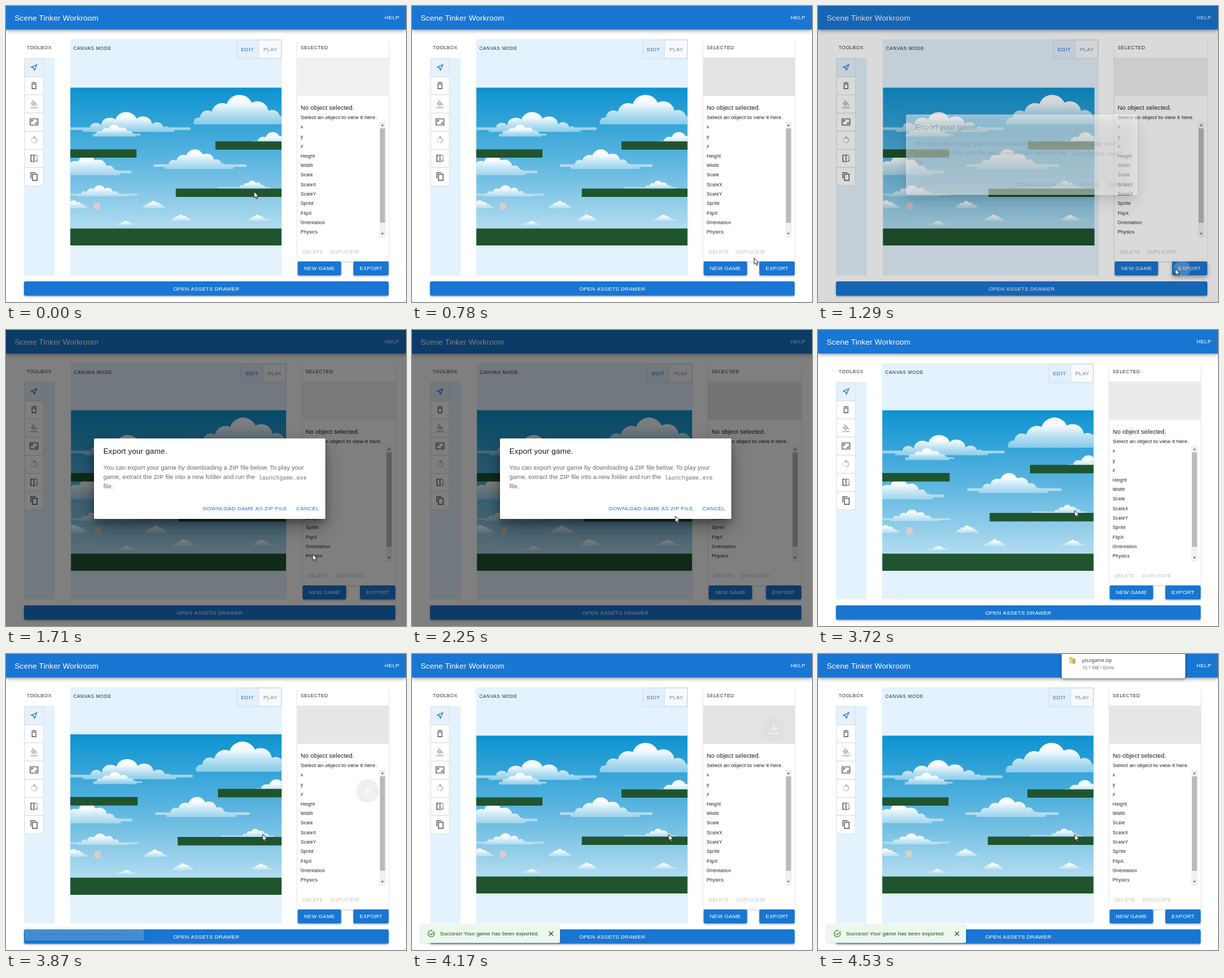
An HTML page with a canvas for the animation above (4560 ms loop, 600 by 445 pixels).

```html
<!DOCTYPE html>
<html lang="en">
<head>
<meta charset="utf-8">
<title>Game editor export</title>
<style>
html, body { margin: 0; width: 100%; height: 100%; overflow: hidden; background: #fff; }
canvas { display: block; width: 600px; height: 445px; }
</style>
</head>
<body>
<canvas id="stage" width="600" height="445"></canvas>
<script>
const ctx = document.getElementById('stage').getContext('2d');
const LOOP = 4560, STEP = 30;
const SANS = '"Liberation Sans", Arial, sans-serif';
const MONO = '"Liberation Mono", monospace';
const UI = '"Open Sans", sans-serif';
const BLUE = '#1976d2', INK = '#1c1c1c', PALE = '#e3f2fd';

const TIME = {
  press: 1170, open: 1210, grow: 1440,
  freeze: 2820, confirm: 3390, close: 3450, restore: 3645,
  fly: 3780, toast: 3803, shrink: 3930, popup: 4260
};

const clamp = v => Math.max(0, Math.min(1, v));
const ease = v => { v = clamp(v); return v * v * (3 - 2 * v); };
const mix = (a, b, k) => a + (b - a) * k;
const inside = (p, x0, y0, x1, y1) => p.x > x0 && p.x < x1 && p.y > y0 && p.y < y1;

function box(x0, y0, x1, y1, fill, r = 0) {
  ctx.fillStyle = fill;
  ctx.beginPath();
  ctx.roundRect(x0, y0, x1 - x0, y1 - y0, r);
  ctx.fill();
}

function shadowed(blur, dy, alpha, draw) {
  ctx.save();
  ctx.shadowColor = `rgba(0,0,0,${alpha})`;
  ctx.shadowBlur = blur;
  ctx.shadowOffsetY = dy;
  draw();
  ctx.restore();
}

function faded(alpha, draw) {
  if (alpha <= 0) return;
  ctx.save();
  ctx.globalAlpha *= alpha;
  draw();
  ctx.restore();
}

// y is the vertical middle of the capitals; spacing is in em.
function text(str, x, y, size, fill = INK, spacing = 0.01, family = SANS, align = 'left') {
  ctx.font = `${size}px ${family}`;
  ctx.letterSpacing = spacing * size + 'px';
  ctx.textAlign = align;
  ctx.fillStyle = fill;
  ctx.fillText(str, x, y + size * 0.36);
}
const label = (str, x, y, fill, align, size = 8.09) => text(str, x, y, size, fill, 0.0286, SANS, align);
const overline = (str, x, y) => text(str, x, y, 6.94, '#2a2a2a', 0.0833);

function icon(path, cx, cy, color, size = 13.9, width = 2) {
  ctx.save();
  ctx.translate(cx - size / 2, cy - size / 2);
  ctx.scale(size / 24, size / 24);
  ctx.strokeStyle = color;
  ctx.lineWidth = width;
  ctx.stroke(new Path2D(path));
  ctx.restore();
}

function ripple(x, y, elapsed, color, x0, y0, x1, y1) {
  if (elapsed < 0 || elapsed > 600) return;
  ctx.save();
  ctx.beginPath();
  ctx.roundRect(x0, y0, x1 - x0, y1 - y0, 2.3);
  ctx.clip();
  ctx.globalAlpha *= 1 - ease((elapsed - 250) / 350);
  ctx.fillStyle = color;
  ctx.beginPath();
  ctx.arc(x, y, 4 + 70 * ease(elapsed / 550), 0, 7);
  ctx.fill();
  ctx.restore();
}

function button(str, x0, y0, x1, y1, fill = BLUE, lift = 1) {
  shadowed(3 * lift, 1.2 * lift, 0.35, () => box(x0, y0, x1, y1, fill, 2.3));
  label(str, (x0 + x1) / 2, (y0 + y1) / 2, '#fff', 'center');
}

// Puffs relative to the cloud's middle and base, in units of its height: x, y, radius.
const PUFFS = [[0, -0.55, 0.45], [-0.58, -0.36, 0.36], [0.6, -0.4, 0.38],
  [-1.08, -0.22, 0.25], [1.1, -0.22, 0.27], [1.42, -0.12, 0.16], [-1.4, -0.1, 0.13]];
// middle, base, height, spread, streak left, streak right (scene units)
const CLOUDS = [
  [84, 67, 30, 1.4, -6, 181], [66, 74, 18, 1.15, 34, 106], [254, 55.5, 44.5, 1, 190, 330],
  [304, 92, 25, 1, 252, 330], [25, 132, 30, 1, -6, 92], [187, 122.5, 29.5, 1, 125, 265],
  [44, 164, 17, 1.25, -4, 101], [273, 153, 13, 1.1, 222, 301], [5, 181.5, 12, 1, -6, 26],
  [125, 181.5, 11, 0.95, 109, 143], [83, 207, 6.5, 1, 69, 96], [166, 201, 10, 0.95, 150, 182],
  [281, 200.5, 9, 1, 265, 301]];

function cloud([mid, base, h, spread, left, right]) {
  const paint = ctx.createLinearGradient(0, base - h, 0, base);
  paint.addColorStop(0, '#fff');
  paint.addColorStop(0.3, 'rgba(252,254,255,.95)');
  paint.addColorStop(1, 'rgba(205,234,247,.55)');
  const bar = Math.max(1.2, h * 0.13);
  const reach = 1.55 * h * spread;
  ctx.save();
  ctx.beginPath();
  ctx.rect(-20, base - h - 1, 400, h + 1);
  ctx.clip();
  ctx.beginPath();
  for (const [x, y, r] of PUFFS) {
    const cx = mid + x * h * spread, rx = r * h * Math.sqrt(spread);
    ctx.moveTo(cx + rx, base + y * h);
    ctx.ellipse(cx, base + y * h, rx, r * h, 0, 0, Math.PI * 2);
  }
  ctx.rect(mid - reach * 0.8, base - 0.3 * h, reach * 1.6, 0.3 * h);
  ctx.roundRect(left, base - bar * 1.8, right - left, bar, bar / 2);
  ctx.roundRect(mid - reach, base - bar, mix(mid, right, 0.75) - mid + reach, bar, bar / 2);
  ctx.fillStyle = paint;
  ctx.fill();
  ctx.restore();
}

function scene(left, right, large) {
  const k = large ? 322.6 / 317 : 1;
  ctx.save();
  ctx.beginPath();
  ctx.rect(left, 110, right - left, 260);
  ctx.clip();
  ctx.translate(left, 241.3 - 118.8 * k);
  ctx.scale(k, k);
  ctx.beginPath();
  ctx.rect(0, 0, 317.5, 237.5);
  ctx.clip();
  const sky = ctx.createLinearGradient(0, 0, 0, 213);
  sky.addColorStop(0, '#0d93d0');
  sky.addColorStop(0.5, '#59b4df');
  sky.addColorStop(1, '#b3dcef');
  ctx.fillStyle = sky;
  ctx.fillRect(0, 0, 318, 237.5);
  CLOUDS.forEach(cloud);
  const green = '#20542e';
  box(0, 212, 318, 238, green);
  box(0, 93, 99.5, 105.5, green);
  box(218, 81, 318, 93.5, green);
  box(158.5, 152, 318, 164.5, green);
  box(35.5, 173, 45, 183.5, '#dccbc9', 3);
  ctx.restore();
}

const TOOLS = [
  ['M19.2 4.8 5 10.9 10.800 13.200 13.100 19Z', BLUE],
  ['M7 8.500H17V20H7ZM5 5H19M9.500 3.800H14.500', '#555'],
  ['M7 2 17 11.500 11 17.500 5 11.500 11 6M5 12H17M19.500 13V17M2 22H22', '#a5a5a5'],
  ['M2 4H22V20H2ZM6 12V8H10M18 12V16H14', '#444'],
  ['M12 5A7 7 0 0 1 12 19M9.500 18.500 7.500 17.500M5.500 15 5 12.500M5.500 9.500 7 7.500M14 1.500 10 5 14 8.500', '#a5a5a5'],
  ['M9 4H4V20H9M12 1V23M15 4H17M19 4V6M20 8V10M20 12V14M20 16V18M15 20H17M19 20V18', '#444'],
  ['M8 6H20V22H8ZM16 2H4V17', '#444']];

function toolbox() {
  overline('TOOLBOX', 31, 63);
  box(27, 78, 73, 405, PALE, 2);
  box(28, 79, 56, 270, '#fff', 2);
  box(28, 79, 56, 106, '#e7f1fb', 2);
  ctx.strokeStyle = '#d4dbe1';
  ctx.lineWidth = 0.7;
  TOOLS.forEach(([path, color], i) => {
    const y = 79 + i * 27.3;
    ctx.strokeRect(28, y, 28, 27.3);
    icon(path, 42, y + 13.5, color);
  });
}

function canvasPanel(left, right, large) {
  box(left, 50, right, 405, PALE, 2);
  overline('CANVAS MODE', left + 5, 63.5);
  const x = right - 68;
  box(x, 51, right - 1, 79, '#f7fafd', 2);
  box(x, 51, x + 33, 79, '#e3effa', 2);
  ctx.strokeStyle = '#ced8e0';
  ctx.lineWidth = 0.7;
  ctx.strokeRect(x, 51, 67, 28);
  ctx.strokeRect(x + 33, 51, 34, 28);
  label('EDIT', x + 6.5, 65, BLUE);
  label('PLAY', x + 40, 65, '#7d8389');
  scene(left + 0.2, right - 0.7, large);
}

const FIELDS = ['x', 'y', 'z', 'Height', 'Width', 'Scale', 'ScaleX', 'ScaleY',
  'Sprite', 'FlipX', 'Orientation', 'Physics'];

function triangle(x, y, dir) {
  ctx.fillStyle = '#555';
  ctx.beginPath();
  ctx.moveTo(x - 2, y + dir);
  ctx.lineTo(x + 2, y + dir);
  ctx.lineTo(x, y - dir);
  ctx.fill();
}

function selectedPanel(left, right, t, hoverExport) {
  shadowed(2, 0.6, 0.3, () => box(left, 51, right, 384, '#fff', 2));
  box(left, 46, right, 76, '#fff');
  overline('SELECTED', left + 5, 63);

  // The placeholder pulses, and rests while the picture stands still.
  const held = t >= TIME.freeze && t < TIME.confirm ? TIME.freeze : t;
  const peak = t < TIME.confirm ? 680 : 4200;
  const glow = 0.7 + 0.3 * Math.cos((held - peak) * Math.PI / 1000);
  box(left, 77.5, right, 135, `rgba(0,0,0,${0.11 * glow})`);

  text('No object selected.', left + 5, 152.5, 9.25);
  text('Select an object to view it here.', left + 5, 167, 8.09);
  FIELDS.forEach((name, i) => text(name, left + 5, 182 + i * 14.36, 6.94, INK, 0.0333));

  const bar = right - 14;
  box(bar, 174, bar + 9.5, 348, '#f1f1f1');
  box(bar + 1, 184, bar + 8.5, 326, '#bababa');
  triangle(bar + 4.7, 179, 1.2);
  triangle(bar + 4.7, 342.5, -1.2);

  label('DELETE', left + 8, 369.5, '#bdbdbd', 'left', 7.51);
  label('DUPLICATE', left + 49.5, 369.5, '#bdbdbd', 'left', 7.51);
  const pressed = t >= TIME.press && t < TIME.press + 300;
  button('NEW GAME', left + 0.5, 384, left + 65.7, 405);
  button('EXPORT', right - 53, 384, right, 405, hoverExport ? '#1565c0' : BLUE, pressed ? 2.2 : 1);
  ripple(546, 395, t - TIME.press, 'rgba(255,255,255,.25)', right - 53, 384, right, 405);
}

function header() {
  shadowed(6, 2, 0.4, () => box(0, 0, 600, 35.4, BLUE));
  text('Scene Tinker Workroom', 13, 17.5, 11.56, '#fff', 0.0075);
  label('HELP', 568, 17.5, '#fff');
}

function dialog(t, hover) {
  const grey = '#666', x = 146;
  const panel = () => box(132, 163, 479, 284, '#fff', 2.3);
  shadowed(28, 13, 0.3, panel);
  shadowed(10, 6, 0.25, panel);
  text('Export your game.', x, 182, 11.56, INK, 0.0075);
  text('You can export your game by downloading a ZIP file below. To play your', x, 207, 9.25, grey, 0.0094);
  text('game, extract the ZIP file into a new folder and run the', x, 221, 9.25, grey, 0.0094);
  text('launchgame.exe', 379, 221.5, 8.45, '#747474', 0.0103, MONO);
  text('file.', x, 235, 9.25, grey, 0.0094);
  if (hover) box(290.5, 258, 426.5, 279, '#f5f9fd', 2.3);
  ripple(385, 271, t - TIME.confirm, 'rgba(25,118,210,.25)', 290.5, 258, 426.5, 279);
  label('DOWNLOAD GAME AS ZIP FILE', 295, 268.5, BLUE);
  label('CANCEL', 435.5, 268.5, BLUE);
}

function toast(t) {
  const age = t - TIME.toast;
  if (age <= 0) return;
  const s = mix(0.75, 1, ease(age / 150));
  faded(ease(age / 225), () => {
    ctx.translate(117.5, 420.5);
    ctx.scale(s, s * s);
    ctx.translate(-117.5, -420.5);
    shadowed(3, 0.6, 0.2, () => box(13, 407, 222, 434.5, '#edf7ed', 2.3));
    icon('M20.500 10A9 9 0 1 1 15.500 3.700M7.500 11.500 11.500 15.500 21 5.500', 29, 420.5, '#2e7d32', 12.7);
    text('Success! Your game has been exported.', 42, 420.5, 8.09, '#1e4620', 0.0107);
    icon('M5.500 5.500 18.500 18.500M18.500 5.500 5.500 18.500', 208.5, 420.5, '#1e4620', 11.5, 2.3);
  });
}

function flyingBadge(t) {
  const u = (t - TIME.fly) / 450;
  if (u <= 0 || u >= 1) return;
  const y = mix(234, 94, u);
  faded(1 - 4 * (u - 0.5) ** 2, () => {
    ctx.fillStyle = 'rgba(205,205,205,.5)';
    ctx.beginPath();
    ctx.arc(542.5, y, 17.3, 0, 7);
    ctx.fill();
    icon('M12 3V15M6.500 10 12 15.500 17.500 10M4 15V20H20V15', 542.5, y, '#fff', 20, 2.5);
  });
}

function downloadPopup(t) {
  faded(clamp((t - TIME.popup) / 90), () => {
    shadowed(5, 1.5, 0.4, () => box(365.5, -6, 551, 36.5, '#fff', 3));
    box(377, 5, 382, 9, '#d9b254', 0.8);
    box(377, 6.5, 387, 14.5, '#f0d27d', 0.8);
    box(382.5, 7.5, 384.5, 14.5, '#8c8a80');
    text('yourgame.zip', 396, 9.5, 7.1, '#303134', 0, UI);
    text('10.1 MB • Done', 396, 21, 6.7, '#5f6368', 0, UI);
  });
}

// start time, end time, destination
const MOVES = [[60, 1000, 536, 395], [1380, 1710, 460, 337], [1740, 2400, 385, 271]];

function pointerAt(t) {
  const p = { x: 372, y: 279 };
  for (const [from, to, x, y] of MOVES) {
    const k = ease((t - from) / (to - from));
    p.x = mix(p.x, x, k);
    p.y = mix(p.y, y, k);
  }
  return p;
}

const ARROW = new Path2D('M0 0V9.500L2.200 7.500 3.800 11 5.400 10.300 3.800 6.900H6.800Z');
const HAND = new Path2D('M-1.200 .500Q0-.700 1 .500V5L4.500 5.500 6.300 7V10.500L5 14H-1L-4.500 9V7.500L-3.200 7.300-1.200 9Z');

function pointer(p, hand) {
  ctx.save();
  ctx.translate(p.x, p.y);
  ctx.lineJoin = 'round';
  ctx.lineWidth = 0.9;
  ctx.fillStyle = '#fff';
  ctx.strokeStyle = '#222';
  const shape = hand ? HAND : ARROW;
  ctx.fill(shape);
  ctx.stroke(shape);
  ctx.restore();
}

function draw(t) {
  const wide = t >= TIME.open && t < TIME.restore;
  const large = t >= TIME.grow && t < TIME.shrink;
  const shown = ease((t - TIME.open) / 225) * (1 - ease((t - TIME.close) / 195));
  const right = wide ? 584 : 574;
  const p = pointerAt(t);
  const hoverExport = t < TIME.open && inside(p, 521, 384, 574, 405);
  const hoverZip = wide && inside(p, 290, 258, 427, 279);

  ctx.fillStyle = '#fff';
  ctx.fillRect(0, 0, 600, 445);
  header();
  toolbox();
  canvasPanel(wide ? 97 : 96, wide ? 421 : 414, large);
  selectedPanel(wide ? 444.5 : 437, right, t, hoverExport);
  button('OPEN ASSETS DRAWER', 27, 414, right, 435.5);
  faded(shown, () => {
    box(0, 0, 600, 445, 'rgba(0,0,0,.5)');
    dialog(t, hoverZip);
  });
  toast(t);
  flyingBadge(t);
  downloadPopup(t);
  pointer(p, hoverExport || (hoverZip && t < TIME.close));
}

const start = performance.now();
function tick(now) {
  const t = Math.max(0, now - start) % LOOP;
  draw(Math.floor(t / STEP) * STEP);
  requestAnimationFrame(tick);
}
draw(0);
requestAnimationFrame(tick);
</script>
</body>
</html>
```
